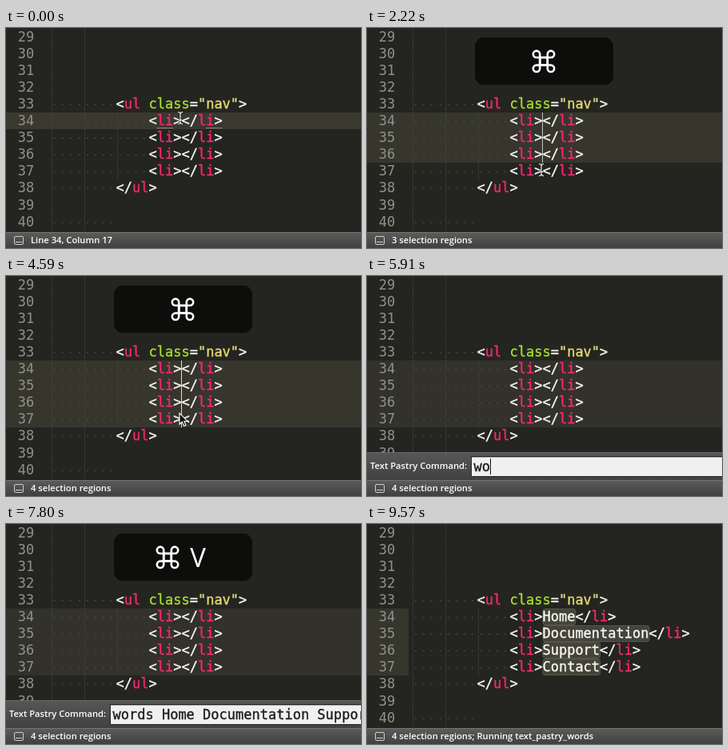
These frames come from a looping animation (444 by 276 pixels, 9.66 s). An HTML page with a canvas:

```html
<!DOCTYPE html>
<html>
<head>
<meta charset="utf-8">
<style>
html, body { margin: 0; width: 100%; height: 100%; overflow: hidden; background: #242521; }
canvas { display: block; }
</style>
</head>
<body>
<canvas id="stage" width="444" height="276"></canvas>
<script>
const g = document.getElementById('stage').getContext('2d');
const LOOP = 9660, CHAR = 10.234, ROW = 21.1, LEFT = 55.7;
const MONO = '17px "DejaVu Sans Mono", monospace';
const UI = '600 11.2px "Open Sans", sans-serif';
const WHITE = '#f8f8f2', PINK = '#f92672', GREEN = '#a6e22e', YELLOW = '#e6db74';
const WORDS = ['Home', 'Documentation', 'Support', 'Contact'];

// Times of the events, in ms
const CLICKS = [1320, 1830, 2430], PANEL = 4650, RUN = 8130;
const TYPED = [
  [PANEL, ''], [5730, 'w'], [5910, 'wo'], [6270, 'wor'], [6330, 'word'],
  [6420, 'words'], [7020, 'words '], [7350, 'words ' + WORDS.join(' ')]
];
const KEYS = [[0, '⌘'], [4620, '⌥⌘N'], [7000, '⌘V'], [8100, '⌘↩']];

const clamp = v => Math.max(0, Math.min(1, v));
const ramp = (t, a, b) => clamp((t - a) / (b - a));
const ease = p => (1 - Math.cos(Math.PI * p)) / 2;
const latest = (list, t) => list.filter(e => e[0] <= t).pop();
const rowTop = n => Math.round(106 + (n - 34) * ROW);
const colX = c => LEFT + c * CHAR;

// Carets stay solid after an action, then fade out and in every 900 ms
function blink(t, since) {
  const p = t - since - 300;
  if (p < 0) return 1;
  const q = p % 900;
  return q < 600 ? 1 - ease(ramp(q, 0, 270)) : ease(ramp(q, 600, 870));
}

function rect(x, y, w, h, color) {
  g.fillStyle = color;
  g.fillRect(x, y, w, h);
}

function text(str, x, y, color, font) {
  g.font = font;
  g.fillStyle = color;
  g.fillText(str, x, y);
}

// Code text is a little heavier than the plain font
function mono(str, x, y, color) {
  text(str, x, y, color, MONO);
  g.strokeStyle = color;
  g.lineWidth = .35;
  g.strokeText(str, x, y);
}

function stroke(path, color, width) {
  g.strokeStyle = color;
  g.lineWidth = width;
  g.stroke(new Path2D(path));
}

function at(x, y, draw) {
  g.save();
  g.translate(x, y);
  draw();
  g.restore();
}

// parts: text and colour in turn
function code(row, col, ...parts) {
  for (let i = 0; i < parts.length; i += 2) {
    mono(parts[i], colX(col), rowTop(row) + 16, parts[i + 1]);
    col += parts[i].length;
  }
}

function guides() {
  for (let row = 29; row <= 40; row++) {
    const top = rowTop(row), item = row > 33 && row < 38;
    for (const c of item ? [0, 4, 8] : [0, 4])
      for (let y = top; y < top + 21; y += 2) rect(Math.round(colX(c)) + 1, y, 1, 1, '#45463f');
    if (row > 32 && row !== 39)
      for (let c = 0; c < (item ? 12 : 8); c++) rect(Math.round(colX(c + .5)) - 1, top + 10.5, 1.5, 1.5, '#4a4b44');
  }
}

function editor(t, regions) {
  const done = t >= RUN, panel = t >= PANEL && !done;
  rect(0, 0, 444, 276, '#242521');
  const top = rowTop(34);
  rect(0, top, done ? 52 : 444, rowTop(34 + regions) - top, panel ? '#32322a' : regions > 1 ? '#36362d' : '#3a392f');
  guides();
  for (let n = 29; n <= 40; n++) text(n, 14.8, rowTop(n) + 16, '#8f908a', MONO);

  code(33, 8, '<', WHITE, 'ul', PINK, ' class', GREEN, '=', WHITE, '"nav"', YELLOW, '>', WHITE);
  code(38, 8, '</', WHITE, 'ul', PINK, '>', WHITE);
  WORDS.forEach((word, i) => {
    const row = 34 + i, y = rowTop(row);
    if (!done) word = '';
    else {
      g.beginPath();
      g.roundRect(colX(16) + .5, y + .5, word.length * CHAR, 20, 3);
      g.fillStyle = '#44443a';
      g.fill();
      g.strokeStyle = '#55554a';
      g.lineWidth = 1;
      g.stroke();
    }
    code(row, 12, '<', WHITE, 'li', PINK, '>' + word + '</', WHITE, 'li', PINK, '>', WHITE);
  });
  if (regions === 1) for (const c of [13, 19]) rect(colX(c), 125, 2 * CHAR, 1, '#8a8976');

  if (panel) return;
  const since = Math.max(-600, ...[...CLICKS, RUN].filter(c => c <= t));
  g.globalAlpha = blink(t, since);
  for (let i = 0; i < regions; i++) {
    const x = colX(16 + (done ? WORDS[i].length : 0));
    rect(Math.round(x), rowTop(34 + i), 1, 21, WHITE);
  }
  g.globalAlpha = 1;
}

function pointer(t) {
  if (t >= PANEL) return;
  const y = 113 + 24 * ease(ramp(t, 450, 1050)) + 21 * ease(ramp(t, 1590, 1780)) + 20 * ease(ramp(t, 2100, 2200));
  if (t < 3600) at(218, y, () => {
    const beam = 'M-3 -7.5 Q0 -7.5 0 -5 Q0 -7.5 3 -7.5 M0 -5 V5 M-3 7.5 Q0 7.5 0 5 Q0 7.5 3 7.5 M-2 2.5 H2';
    stroke(beam, '#222', 2.4);
    stroke(beam, '#fff', 1.1);
  });
  else at(217, 172, () => {
    const arrow = 'M0 0 V14 L3.3 11 L5.6 16.2 L8 15.2 L5.8 10.2 H10 Z';
    g.fillStyle = '#111';
    g.fill(new Path2D(arrow));
    stroke(arrow, '#fff', 1.1);
  });
}

const GLYPHS = {
  '⌘': () => {
    for (let i = 0; i < 4; i++) {
      g.rotate(Math.PI / 2);
      stroke('M-4.8 4.8 V-9 A4.2 4.2 0 1 0 -9 -4.8 H4.8', '#fff', 2.6);
    }
  },
  '⌥': () => stroke('M-13 -9 H-5 L5 9 H13 M3 -9 H13', '#fff', 2.6),
  '↩': () => {
    stroke('M-9 0 H9 A5.5 5.5 0 0 0 9 -11 H4', '#fff', 2.6);
    g.fillStyle = '#fff';
    g.fill(new Path2D('M-16 0 L-7 -6.5 V6.5 Z'));
  }
};

function keys(t) {
  const show = ramp(t, 300, 540) * (1 - ramp(t, 5700, 5900)) + ramp(t, 7230, 7380) * (1 - ramp(t, 8400, 8670));
  if (!show) return;
  g.globalAlpha = show;
  g.beginPath();
  g.roundRect(135, 12, 173, 59.5, 11);
  g.fillStyle = '#0d0d0c';
  g.fill();
  const list = [...latest(KEYS, t)[1]];
  list.forEach((key, i) => at(221 + (i - (list.length - 1) / 2) * 38, 41.8, () => {
    if (GLYPHS[key]) return GLYPHS[key]();
    g.textAlign = 'center';
    text(key, 0, 12, '#fff', '33px "Open Sans", sans-serif');
  }));
  g.globalAlpha = 1;
}

function fade(y, h, top, bottom) {
  const fill = g.createLinearGradient(0, y, 0, y + h);
  fill.addColorStop(0, top);
  fill.addColorStop(1, bottom);
  rect(0, y, 444, h, fill);
}

function commandPanel(t) {
  fade(221, 35, '#575757', '#414141');
  rect(0, 221, 444, 1, '#6b6b6b');
  text('Text Pastry Command:', 4, 242, '#fff', UI);
  rect(130, 226, 314, 26, '#262626');
  rect(131, 227, 313, 24, '#f0f0f0');
  rect(131, 227, 313, 1, '#b5b5b5');
  const [time, typed] = latest(TYPED, t);
  mono(typed, 133.5, 245, '#1c1c1c');
  g.globalAlpha = blink(t, Math.max(time, 4830));
  rect(Math.round(133.5 + typed.length * CHAR), 229, 1, 20, '#111');
  g.globalAlpha = 1;
}

function statusBar(t, regions) {
  fade(256, 20, '#5c5c5c', '#404040');
  rect(0, 256, 444, 1, '#747474');
  g.beginPath();
  g.roundRect(10.5, 261.5, 11, 10, 1.5);
  g.strokeStyle = '#d0d0d0';
  g.lineWidth = 1;
  g.stroke();
  rect(12, 268, 8, 1, '#d0d0d0');
  const state = regions > 1 ? regions + ' selection regions' : 'Line 34, Column 17';
  text(state + (t >= RUN ? '; Running text_pastry_words' : ''), 31, 270, '#fff', UI);
}

function draw(now) {
  const t = now % LOOP;
  const regions = 1 + CLICKS.filter(c => c <= t).length;
  editor(t, regions);
  pointer(t);
  keys(t);
  if (t >= PANEL && t < RUN) commandPanel(t);
  statusBar(t, regions);
  requestAnimationFrame(draw);
}
requestAnimationFrame(draw);
</script>
</body>
</html>
```
